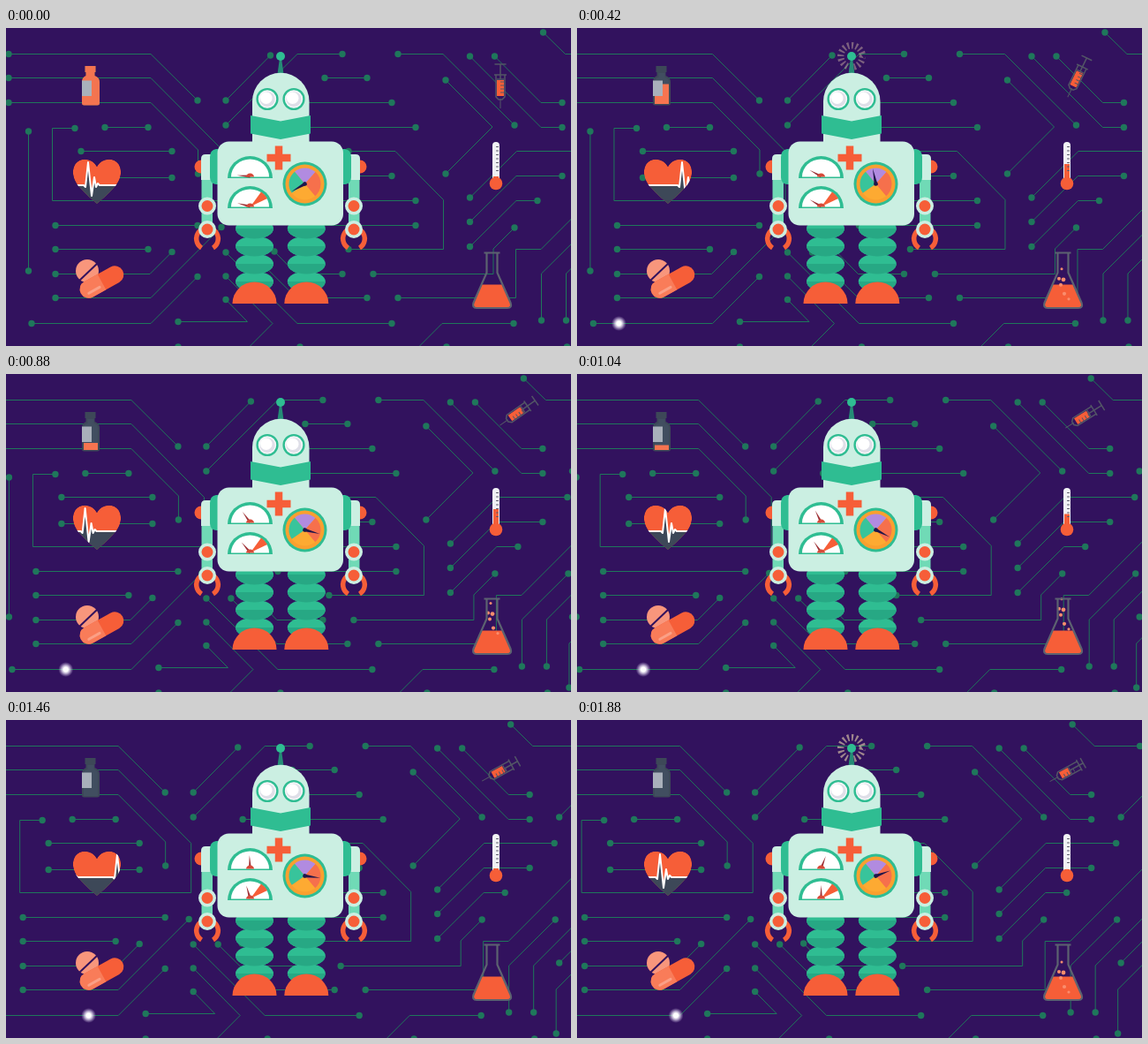
Animation, 640 px wide and 360 px high, one loop 1.93 s. Source, as an HTML page:

```html
<!DOCTYPE html>
<html lang="en">
<head>
<meta charset="utf-8">
<title>Medical robot</title>
<style>
html, body { margin: 0; width: 100%; height: 100%; overflow: hidden; background: #32125e }
svg { display: block; width: 100vw; height: 100vh }
#net path { fill: none; stroke: #1f775b; marker-start: url(#node); marker-end: url(#node) }
.mint { fill: #cbefe2 }
.green { fill: #2fbd92 }
.red { fill: #f65e38 }
.slate { fill: #3d4858 }
</style>
</head>
<body>
<svg viewBox="0 0 640 360">
<defs>
  <marker id="node" markerUnits="userSpaceOnUse" markerWidth="10" markerHeight="10" refX="5" refY="5">
    <circle cx="5" cy="5" r="3.7" fill="#1f775b"/>
  </marker>
  <radialGradient id="glow">
    <stop offset=".3" stop-color="#fff"/>
    <stop offset=".55" stop-color="#e4dcf0" stop-opacity=".75"/>
    <stop offset="1" stop-color="#b9a6d6" stop-opacity="0"/>
  </radialGradient>
  <clipPath id="heartClip"><path id="heart" d="M103 157C98 147 84 146 78.500 154C73 163 77 174 84 181C90 188 97 194 103 199C109 194 116 188 122 181C129 174 133 163 127.500 154C122 146 108 147 103 157z"/></clipPath>
  <clipPath id="bottleClip"><path d="M92.500 51H99.500V55.500Q104 57 104 61V86H88V61Q88 57 92.500 55.500z"/></clipPath>
  <path id="bottle" d="M89.500 43H101.500V50H100.500V54Q106 56 106 61V85Q106 87.500 103.500 87.500H88.500Q86 87.500 86 85V61Q86 56 90.500 54V50H89.500z"/>
  <g id="eye">
    <circle r="11.400" fill="#f6f6f8" stroke="#2fbd92" stroke-width="2.400"/>
    <circle r="8.600" fill="#dfdfe8"/>
    <circle cx="-1.300" cy="-1.300" r="6.800" fill="#fff"/>
  </g>
  <g id="joint"><circle r="10" class="mint"/><circle r="6.500" class="red"/></g>
  <g id="arm">
    <circle cx="221" cy="157" r="7.500" class="red"/>
    <rect x="221.500" y="165" width="12.500" height="64" fill="#70dab6"/>
    <path d="M232 143H226Q221 143 221 148V172H232z" class="mint"/>
    <path d="M242 137H238Q231 138 231 146V169Q231 176 238 177H242z" class="green"/>
    <path d="M221.500 249A12.300 12.300 0 1 1 234.500 249" fill="none" stroke="#f65e38" stroke-width="5.500"/>
    <use href="#joint" x="228" y="201.500"/>
    <use href="#joint" x="228" y="228"/>
  </g>
  <g id="ring">
    <ellipse rx="21.500" ry="11.500" class="green"/>
    <path d="M-21.500 0A21.500 11.500 0 0 0 21.500 0z" fill="#27a884"/>
  </g>
  <g id="leg">
    <use href="#ring" y="287"/><use href="#ring" y="267"/><use href="#ring" y="247"/><use href="#ring" y="227"/>
    <path d="M-25 312A25 24.500 0 0 1 25 312z" class="red"/>
  </g>
  <g id="gauge">
    <path d="M-25.500 0A25.500 25 0 0 1 25.500 0z" class="green"/>
    <path d="M-21.500 -1.500A21.500 20 0 0 1 21.500 -1.500z" fill="#fff"/>
  </g>
</defs>

<rect width="640" height="360" fill="#32125e"/>

<g id="net">
  <!-- left -->
  <path d="M3 29.500H164l53 52.500"/>
  <path d="M3 56.500H164l82.500 83V195.500H52.500V113.500H78"/>
  <path d="M3 84.500H164l53.500 53.500V165"/>
  <path d="M112 112.500H161"/>
  <path d="M25.500 117V275"/>
  <path d="M85 139.500H188"/>
  <path d="M85 169.500H188"/>
  <path d="M56 223.500H217"/>
  <path d="M56 250.500H161"/>
  <path d="M56 278.500H163l25 -25"/>
  <path d="M56 305.500H164l80 -80"/>
  <path d="M29 334.500H164l53 -53"/>
  <path d="M195 332.500H273.500l-24.500 -25"/>
  <path d="M195 361V380"/>
  <!-- middle -->
  <path d="M249 82l50.500 -51"/>
  <path d="M249 110l81 -80.500H381"/>
  <path d="M361 56.500H409"/>
  <path d="M332 84.500H437"/>
  <path d="M305 112.500H464"/>
  <path d="M388 139.500H441l54.500 55V250.500H388"/>
  <path d="M330 167.500H437"/>
  <path d="M330 195.500H464"/>
  <path d="M330 223.500H464"/>
  <path d="M304 253l25 25.500H381"/>
  <path d="M277 254l52 51.500H409"/>
  <path d="M249 254l81 80.500H437"/>
  <path d="M249 281l53 53.500l-40 40"/>
  <path d="M333 361V380"/>
  <!-- right -->
  <path d="M444 29.500H495l81 80.500"/>
  <path d="M525.500 32l80.500 80.500H630"/>
  <path d="M553.500 32l52.500 52.500H630"/>
  <path d="M608.500 5l25 24.500H685"/>
  <path d="M498 59l53 53l-53 53"/>
  <path d="M525.500 192l53 -52.500H658"/>
  <path d="M525.500 219.500l52.500 -52H630"/>
  <path d="M525.500 247.500l52.500 -52H602"/>
  <path d="M416 278.500H552V250l24 -24"/>
  <path d="M444 305.500H577.500V250.500H606l90 -90"/>
  <path d="M575 334.500H494l-40 40"/>
  <path d="M606.500 331V278l52.500 -52"/>
  <path d="M634.500 331V278l60 -60"/>
  <path d="M660 355V305l50 -50"/>
  <path d="M663.500 275l40 -40"/>
  <path d="M663.500 110l40 -40"/>
  <path d="M499 361V380"/>
  <path d="M635.500 361V380"/>
</g>
<circle id="pulse" cy="334.500" r="8.500" fill="url(#glow)"/>

<!-- bottle -->
<use href="#bottle" class="slate"/>
<g clip-path="url(#bottleClip)">
  <rect x="86" y="50" width="20" height="38" fill="#414e60"/>
  <rect id="medicine" x="86" width="20" height="50" fill="#f67450"/>
</g>
<use href="#bottle" id="full" fill="#f37450"/>
<rect x="86" y="59.500" width="11" height="17.500" fill="#a9b0bb"/>

<!-- heart -->
<g clip-path="url(#heartClip)">
  <use href="#heart" class="red"/>
  <path id="under" class="slate"/>
  <path id="beat" fill="none" stroke="#fff" stroke-width="2" stroke-linejoin="round"/>
</g>

<!-- pills -->
<circle cx="92" cy="275" r="13" fill="#f8967c"/>
<path d="M83 286L104.500 265.500" stroke="#32125e" stroke-width="2"/>
<g transform="translate(108.500 287.500) rotate(-29)">
  <rect x="-27" y="-10" width="54" height="20" rx="10" class="red"/>
  <path d="M0 -10H-17A10 10 0 0 0 -17 10H0z" fill="#f97c59"/>
  <path d="M-19 4H-5" stroke="#fba086" stroke-width="3" stroke-linecap="round"/>
</g>

<!-- syringe -->
<g id="syringe" fill="none" stroke="#535666" stroke-width="1.500">
  <path d="M0 14V25" stroke-width="1"/>
  <g id="plunger"><path d="M-6.500 -25H6.500M0 -25V-8M-4 -8H4"/></g>
  <rect id="dose" x="-4" width="8" stroke="none" class="red"/>
  <path d="M-7 -13H7M-5 -13V12L-2 15H2L5 12V-13"/>
  <path d="M0 -5H4M0 -1H4M0 3H4M0 7H4" stroke-width="1"/>
</g>

<!-- thermometer -->
<rect x="551" y="129" width="8" height="46" rx="4" fill="#f1f2f5"/>
<rect id="mercury" x="552" width="6" class="red"/>
<path d="M555 134.500H558M555 139H558M555 143.500H558M555 148H558M555 152.500H558M555 157H558M555 161.500H558" stroke="#60606e"/>
<circle cx="555" cy="176" r="7.300" class="red"/>

<!-- flask -->
<path d="M538.500 290.500H562.500L571.500 312Q572 316 568 316.500H533Q529 316 530 312z" class="red"/>
<g id="bubbles" fill="#fa8d6d"></g>
<path d="M541.500 254.500H559.500M544.500 255V277L529.500 311Q528 317 533 317H568Q573.500 317 571.500 311L556.500 277V255" fill="none" stroke="#5c6270" stroke-width="2.200"/>

<!-- robot -->
<circle id="rays" cx="311" cy="32" r="12.300" fill="none" stroke="#ead6ae" stroke-width="7.500" pathLength="64" stroke-dasharray="1.700 2.300"/>
<path d="M310 34H312L314.500 52H307.500z" fill="#258c76"/>
<circle cx="311" cy="32" r="5" class="green"/>
<use href="#leg" x="281.500"/>
<use href="#leg" x="340.300"/>
<use href="#arm"/>
<use href="#arm" transform="translate(622 0) scale(-1 1)"/>
<path d="M279 83A32.200 32.200 0 0 1 343.500 83V130H279z" class="mint"/>
<path d="M277 99L311 105.500L345 99V119.500L311 126L277 119.500z" class="green"/>
<use href="#eye" x="296" y="80.500"/>
<use href="#eye" x="326" y="80.500"/>
<rect x="239.500" y="128.500" width="142.500" height="95" rx="13" class="mint"/>
<path d="M295.500 147H322.500M309 133.500V160.500" stroke="#f65e38" stroke-width="8.500"/>

<use href="#gauge" x="276.500" y="170"/>
<g class="needle" transform="translate(276.500 168)"><path d="M-1.500 0L0 -15L1.500 0z" fill="#9f3136"/></g>
<path d="M272 168.500A4.500 4 0 0 1 281 168.500z" fill="#d84a39"/>
<use href="#gauge" x="276.500" y="204"/>
<path d="M277 202L289 185.500Q294 189 296 193z" class="red"/>
<g class="needle" transform="translate(276.500 202)"><path d="M-1.500 0L0 -15L1.500 0z" fill="#9f3136"/></g>
<path d="M272 202.500A4.500 4 0 0 1 281 202.500z" fill="#d84a39"/>

<g transform="translate(338.500 176.500)">
  <circle r="25" class="green"/>
  <circle r="22" fill="#f9a02f"/>
  <g id="sectors"></g>
  <path id="hand" d="M-2 1.500L0 -17.500L2 1.500z" fill="#20164a"/>
  <circle r="2.300" fill="#20164a"/>
</g>
</svg>

<script>
const $ = id => document.getElementById(id);
const set = (el, attrs) => { for (const k in attrs) el.setAttribute(k, attrs[k]); };
const add = (parent, tag, attrs) => {
  const el = document.createElementNS('http://www.w3.org/2000/svg', tag);
  set(el, attrs);
  return parent.appendChild(el);
};
const clamp = v => Math.max(0, Math.min(1, v));

// Linear interpolation through [step, value] pairs.
function track(n, keys) {
  let i = 1;
  while (i < keys.length - 1 && keys[i][0] < n) i++;
  const [a, u] = keys[i - 1], [b, v] = keys[i];
  return u + (v - u) * clamp((n - a) / (b - a));
}

const LOOP = 1930, LAST = 45;

// Dial sectors: start and end angle, clockwise from the top.
for (const [from, to, fill] of [[-40, 42, '#b18be0'], [42, 140, '#f6704c'], [140, 235, '#fdaa32'], [235, 320, '#38c49b']]) {
  const at = deg => {
    const a = deg * Math.PI / 180;
    return `${18 * Math.sin(a)} ${-18 * Math.cos(a)}`;
  };
  add($('sectors'), 'path', { d: `M0 0L${at(from)}A18 18 0 0 1 ${at(to)}z`, fill });
}

// Bubbles: x, height halfway up, radius.
const bubbles = [[549, 268, 1.5], [546, 279, 2], [551, 280, 2.4], [548, 286, 2], [552, 296, 2.1], [557, 302, 1.6]]
  .map(([cx, y, r]) => ({ y, el: add($('bubbles'), 'circle', { cx, r }) }));

const spike = x => `L${x - 5} 178L${x - 3} 180L${x} 152L${x + 4} 190L${x + 7} 169L${x + 9} 180L${x + 11} 176L${x + 13} 178`;

function draw(n) {
  set($('net'), { transform: `translate(${-1.052 * n} 0)` });
  set($('pulse'), { cx: 29 + 1.845 * n, opacity: clamp(n / 5) });
  set($('rays'), { opacity: track(n, [[0, 0], [4, 1], [7, 1], [12, 0], [42, 0], [47, 1]]) });

  set($('medicine'), { y: track(n, [[0, 43], [6, 57], [14, 70], [21, 78], [29, 83], [35, 86], [45, 88]]) });
  set($('full'), { opacity: clamp(1 - n / 4) });

  const x = 70 + (23 + 2.6 * n) % 58;
  const line = `M0 178${spike(x - 58)}${spike(x)}L200 178`;
  set($('beat'), { d: line });
  set($('under'), { d: line + 'V210H0z' });

  const sx = track(n, [[0, 560], [6, 562], [14, 571.5], [21, 580], [29, 569], [35, 561], [45, 557.5]]);
  const sy = track(n, [[0, 66], [6, 60], [14, 51.5], [21, 43.7], [29, 52], [35, 57], [45, 57.5]]);
  const tilt = track(n, [[0, 0], [6, 15], [14, 37], [21, 55], [29, 61], [45, 61]]);
  const push = track(n, [[0, 0], [29, 2], [45, 7]]);
  set($('syringe'), { transform: `translate(${sx} ${sy}) rotate(${tilt})` });
  set($('plunger'), { transform: `translate(0 ${push})` });
  set($('dose'), { y: push - 7, height: 18 - push });

  const top = track(n, [[0, 168], [6, 158], [14, 150], [21, 153], [29, 164], [35, 168], [45, 169]]);
  set($('mercury'), { y: top, height: 174 - top });

  const m = n < 36 ? n : n - 36;
  set($('bubbles'), { opacity: clamp((m - 1) / 3) * clamp((34 - m) / 4) });
  for (const b of bubbles) {
    const cy = b.y - 1.2 * (m - 14);
    set(b.el, { cy, opacity: cy > 249 && cy < 313 ? 1 : 0 });
  }

  [-85 + 2.35 * n, -76 + 1.7 * n].forEach((deg, i) =>
    set(document.querySelectorAll('.needle')[i].firstChild, { transform: `rotate(${deg})` }));
  const turn = track(n, [[0, 240], [6, 300], [14, 397], [21, 465], [25, 477], [29, 473], [35, 457], [45, 430]]);
  set($('hand'), { transform: `rotate(${turn})` });
}

// 24 steps per second, each starting on a multiple of 10 ms.
function step(t) {
  const n = Math.floor(t * 0.024) + 1;
  return Math.min(LAST, Math.round(n * 100 / 24) * 10 > t ? n - 1 : n);
}

const start = performance.now();
function tick() {
  draw(step((performance.now() - start) % LOOP));
  requestAnimationFrame(tick);
}
tick();
</script>
</body>
</html>
```
